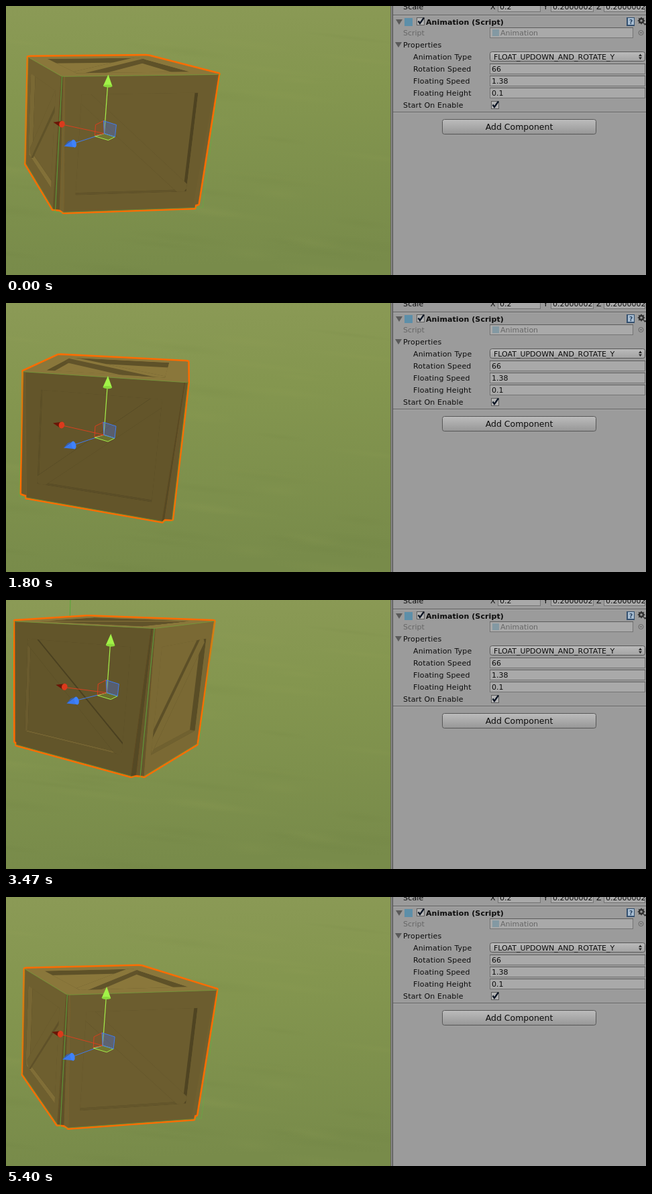
Recreate the animation shown at these times as an HTML page with a canvas. Size 954 by 402 pixels, loop 5.47 s.

```html
<!DOCTYPE html>
<html lang="en">
<head>
<meta charset="utf-8">
<title>Floating crate</title>
<style>
html, body { margin: 0; width: 100%; height: 100%; overflow: hidden; background: #9b9b9b; }
canvas { display: block; width: 954px; height: 402px; }
</style>
</head>
<body>
<canvas id="stage" width="954" height="402"></canvas>
<script>
const W = 954, H = 402, SCENE_W = 574;
const LOOP = 5470, STEP = 200 / 3, RAD = Math.PI / 180;
const stage = document.getElementById('stage').getContext('2d');
const backdrop = document.createElement('canvas');
backdrop.width = W;
backdrop.height = H;
let ctx = stage;

function path(points, open) {
  ctx.beginPath();
  points.forEach(([x, y], i) => i ? ctx.lineTo(x, y) : ctx.moveTo(x, y));
  if (!open) ctx.closePath();
}

function fill(points, color) {
  path(points);
  ctx.fillStyle = color;
  ctx.fill();
}

function line(points, color, width = 1) {
  path(points, true);
  ctx.strokeStyle = color;
  ctx.lineWidth = width;
  ctx.stroke();
}

function rect(x, y, w, h, color) {
  ctx.fillStyle = color;
  ctx.fillRect(x, y, w, h);
}

function text(str, x, y, { size = 11, weight = 400, color = '#0c0c0c', align = 'left', spacing = 0 } = {}) {
  ctx.font = `${weight} ${size}px "DejaVu Sans", sans-serif`;
  ctx.letterSpacing = spacing + 'px';
  ctx.textAlign = align;
  ctx.fillStyle = color;
  ctx.fillText(str, x, y);
}

// ---------- scene background and inspector panel ----------

function drawGround() {
  const g = ctx.createLinearGradient(0, 0, 20, H);
  g.addColorStop(0, '#8b9a56');
  g.addColorStop(0.35, '#84964f');
  g.addColorStop(1, '#788b4a');
  rect(0, 0, SCENE_W, H, g);

  ctx.save();
  ctx.beginPath();
  ctx.rect(0, 0, SCENE_W, H);
  ctx.clip();
  let seed = 7;
  const rnd = () => (seed = seed * 16807 % 2147483647) / 2147483647;
  for (let i = 0; i < 45; i++) {
    ctx.save();
    ctx.translate(rnd() * SCENE_W, rnd() * H);
    ctx.rotate(0.12);
    ctx.scale(40 + rnd() * 70, 4 + rnd() * 8);
    const tone = rnd() < 0.5 ? '160,170,90' : '90,110,50';
    const soft = ctx.createRadialGradient(0, 0, 0, 0, 0, 1);
    soft.addColorStop(0, `rgba(${tone},.07)`);
    soft.addColorStop(1, `rgba(${tone},0)`);
    rect(-1, -1, 2, 2, soft);
    ctx.restore();
  }
  ctx.restore();
}

function field(x, y, w, value, color) {
  rect(x, y, w, 16, '#747474');
  rect(x + 1, y + 1, w - 2, 14, '#a9a9a9');
  rect(x, y, w, 1, '#5c5c5c');
  if (value) {
    ctx.save();
    ctx.beginPath();
    ctx.rect(x, y, w - 1, 16);
    ctx.clip();
    text(value, x + 3, y + 12, { color });
    ctx.restore();
  }
}

function checkbox(x, y) {
  rect(x, y, 12, 12, '#5e5e5e');
  rect(x + 1, y + 1, 10, 10, '#b4b4b4');
  line([[x + 2.5, y + 5.5], [x + 5, y + 9], [x + 11, y + 0.5]], '#0b1524', 2.2);
}

function foldout(x, y) {
  fill([[x, y - 4], [x + 10, y - 4], [x + 5, y + 4]], '#5a5a5a');
}

function button(x, y, w, h, r, label, size, top, bottom) {
  const g = ctx.createLinearGradient(0, y, 0, y + h);
  g.addColorStop(0, top);
  g.addColorStop(1, bottom);
  ctx.beginPath();
  ctx.roundRect(x + 0.5, y + 0.5, w - 1, h - 1, r);
  ctx.fillStyle = g;
  ctx.fill();
  ctx.strokeStyle = '#575757';
  ctx.lineWidth = 1;
  ctx.stroke();
  if (label) text(label, x + w / 2, y + h / 2 + 4, { size, align: 'center' });
}

function drawInspector() {
  rect(SCENE_W, 0, W - SCENE_W, H, '#9b9b9b');
  rect(573, 0, 4, H, '#858585');
  rect(573, 0, 1, H, '#666b55');
  rect(576, 0, 1, H, '#4e4e4e');

  const label = (str, x, y) => text(str, x, y, { spacing: 0.18 });
  label('Scale', 592, 5);
  [['X', 722, '0.2'], ['Y', 801, '0.2000002'], ['Z', 880, '0.2000002']].forEach(([axis, x, value]) => {
    text(axis, x, 5);
    field(x + 11, -7, axis === 'Z' ? 62 : 64, value);
  });

  rect(577, 13, 377, 1, '#5f5f5f');
  rect(577, 14, 377, 1, '#a8a8a8');
  foldout(581, 24);
  rect(594, 18, 12, 12, '#5d8fa9');
  checkbox(612, 17);
  text('Animation (Script)', 626, 28, { weight: 700, spacing: 0.1 });

  rect(925, 17, 12, 13, '#34506f');
  rect(927, 18, 9, 10, '#a9bed2');
  text('?', 931.5, 27, { size: 9, weight: 700, color: '#1f3c5c', align: 'center' });
  ctx.strokeStyle = '#2f2f2f';
  ctx.lineWidth = 2.4;
  ctx.beginPath();
  ctx.arc(947, 22, 3, 0, 7);
  ctx.stroke();
  for (let i = 0; i < 8; i++) {
    const c = Math.cos(i * 45 * RAD), s = Math.sin(i * 45 * RAD);
    line([[947 + 3 * c, 22 + 3 * s], [947 + 5.3 * c, 22 + 5.3 * s]], '#2f2f2f', 1.6);
  }
  fill([[950, 26], [955, 26], [952.5, 29]], '#2f2f2f');

  const grey = '#676767';
  text('Script', 592, 44, { color: grey });
  field(721, 32, 214);
  rect(725, 35, 10, 10, '#8399a3');
  text('Animation', 737, 44, { color: grey });
  ctx.strokeStyle = grey;
  ctx.lineWidth = 1;
  ctx.beginPath();
  ctx.arc(946.5, 40, 3.5, 0, 7);
  ctx.stroke();
  rect(945.5, 39, 2, 2, grey);

  foldout(580, 58);
  label('Properties', 592, 62);
  label('Animation Type', 607, 80);
  button(721, 68, 232, 15, 3, '', 11, '#bcbcbc', '#a2a2a2');
  text('FLOAT_UPDOWN_AND_ROTATE_Y', 727, 79.5);
  fill([[943, 75], [948, 75], [945.5, 71.5]], '#222');
  fill([[943, 76.5], [948, 76.5], [945.5, 80]], '#222');
  [['Rotation Speed', '66'], ['Floating Speed', '1.38'], ['Floating Height', '0.1']].forEach(([name, value], i) => {
    label(name, 607, 98 + 18 * i);
    field(721, 86 + 18 * i, 232, value);
  });
  label('Start On Enable', 592, 152);
  checkbox(723, 142);
  rect(577, 158, 377, 1, '#646464');
  rect(577, 159, 377, 1, '#a6a6a6');
  button(650, 169, 230, 23, 3, 'Add Component', 12.5, '#bdbdbd', '#969696');
}

// ---------- camera and crate ----------

const PITCH = 14.1 * RAD, COS = Math.cos(PITCH), SIN = Math.sin(PITCH);

// World axes: x right, y up, z away from the viewer; origin at the pivot's rest position.
function project(x, y, z) {
  const depth = 6.86 + z * COS - y * SIN;
  return [-60 + 708 * (2 + x) / depth, 168 + 708 * (0.223 - y * COS - z * SIN) / depth];
}

const HALF = 0.975, TOP = 1, BOTTOM = -0.745, DEPTH = 0.07;
const TOP_CUT = 0.035, BOTTOM_CUT = 0.11;

const wood = v => `rgb(${v},${v * 0.86},${v * 0.43})`;
const faceLight = deg => 98 + Math.min(24, 38 * (1 - Math.cos((deg + 35) * RAD)));

function isFront(q) {
  let area = 0;
  q.forEach(([x, y], i) => {
    const [nx, ny] = q[(i + 1) % q.length];
    area += x * ny - nx * y;
  });
  return area > 0;
}

// Recessed panel with a diagonal plank; at(p, q, n) maps face coordinates to the screen.
function drawPanel(at, [p0, p1, q0, q1], rising, light, tone, plankLevel) {
  const rectAt = n => [at(p0, q1, n), at(p1, q1, n), at(p1, q0, n), at(p0, q0, n)];
  const wall = (a, b, k, level = 0) =>
    fill([at(...a, level), at(...b, level), at(...b, -DEPTH), at(...a, -DEPTH)], wood(light * k));
  ctx.save();
  path(rectAt(0));
  ctx.clip();
  fill(rectAt(0), wood(light * tone.side));
  wall([p0, q0], [p1, q0], tone.low);
  wall([p0, q0], [p0, q1], tone.left);
  fill(rectAt(-DEPTH), wood(light));

  const [a, b] = rising ? [[p0, q0], [p1, q1]] : [[p0, q1], [p1, q0]];
  const dx = b[0] - a[0], dy = b[1] - a[1], len = Math.hypot(dx, dy);
  const ox = -dy / len * 0.08, oy = dx / len * 0.08;
  const edge = s => [[a[0] + s * ox, a[1] + s * oy], [b[0] + s * ox, b[1] + s * oy]];
  const e1 = edge(1), e2 = edge(-1);
  wall(...e1, tone.plank, plankLevel);
  wall(...e2, tone.plank, plankLevel);
  fill([...e1, e2[1], e2[0]].map(p => at(...p, plankLevel)), wood(light));
  ctx.restore();
}

// Points of a side's outline, as [along, outward], for a given corner cut.
const leftEnd = cut => [-HALF + cut, HALF];
const rightEnd = cut => [HALF - cut, HALF];
const notch = cut => [HALF - 0.75 * cut, HALF - 0.75 * cut];
const nextSide = cut => [HALF, HALF - cut];

function drawCrate(angle, lift) {
  // Point on side k: s runs right along the side, n points outward.
  const side = (k, s, y, n) => {
    const a = (angle + 90 * k) * RAD, c = Math.cos(a), d = Math.sin(a);
    return project(s * c + n * d + 0.03, y + lift, s * d - n * c);
  };
  const put = (k, [s, n], y) => side(k, s, y, n);
  const band = (k, from, to, top = TOP_CUT, bottom = BOTTOM_CUT) => [
    put(k, from(top), TOP), put(k, to(top), TOP),
    put(k, to(bottom), BOTTOM), put(k, from(bottom), BOTTOM)];

  const parts = [], panels = [], edges = [], lid = [];
  for (let k = 0; k < 4; k++) {
    const turn = (((angle + 90 * k) % 360) + 540) % 360 - 180;
    const light = faceLight(turn);
    const quad = band(k, leftEnd, rightEnd);
    if (isFront(quad)) {
      parts.push([quad, wood(light)]);
      panels.push([k, turn, light]);
      edges.push(band(k, leftEnd, rightEnd, 0, 0));
    }
    const near = band(k, rightEnd, notch);
    const far = band(k, notch, nextSide);
    if (isFront(near)) parts.push([near, wood(light * 0.86)]);
    if (isFront(far)) parts.push([far, wood(light * 1.03)]);
    lid.push(put(k, leftEnd(TOP_CUT), TOP), put(k, rightEnd(TOP_CUT), TOP));
  }
  parts.push([lid, wood(138)]);

  ctx.lineJoin = 'round';
  parts.forEach(([q]) => {
    path(q);
    ctx.strokeStyle = '#ff6c00';
    ctx.lineWidth = 5.6;
    ctx.stroke();
  });
  parts.forEach(([q, color]) => {
    fill(q, color);
    ctx.strokeStyle = color;
    ctx.lineWidth = 0.6;
    ctx.stroke();
  });

  const m = HALF - 0.25;
  panels.forEach(([k, turn, light]) => {
    const away = turn < -30;
    const tone = { side: 0.73, low: away ? 1.16 : 0.92, left: away ? 1.08 : 0.95, plank: turn < -55 ? 0.86 : 0.75 };
    drawPanel((p, q, n) => side(k, p, q, HALF + n),
      [-m, m, BOTTOM + 0.23, TOP - 0.22], k % 2 === 1, light, tone, -DEPTH / 2);
  });
  drawPanel((p, q, n) => side(0, p, TOP + n, -q), [-m, m, -m, m], true, 138,
    { side: 0.68, low: 0.68, left: 0.68, plank: 0.7 }, 0);

  edges.forEach(q => {
    path(q);
    ctx.strokeStyle = 'rgba(95,180,65,.5)';
    ctx.lineWidth = 1;
    ctx.stroke();
  });
}

// ---------- move handles ----------

function cone(tip, base, radius, squash, dark, bright) {
  const a = Math.atan2(base[1] - tip[1], base[0] - tip[0]);
  const ox = -Math.sin(a) * radius, oy = Math.cos(a) * radius;
  fill([tip, [base[0] + ox, base[1] + oy], [base[0] - ox, base[1] - oy]], dark);
  ctx.beginPath();
  ctx.ellipse(base[0], base[1], radius * squash, radius, a, 0, 7);
  ctx.fillStyle = bright;
  ctx.fill();
}

function drawHandles([x, y]) {
  const at = (dx, dy) => [x + dx, y + dy];
  const rise = 191 - y, red = rise * 0.1, blue = -rise * 0.06;
  const plane = (pts, color, tint) => {
    const q = pts.map(p => at(...p));
    fill(q, tint);
    line([...q, q[0]], color);
  };
  line([at(0, 0), at(-60, -13 + red)], '#d8401f');
  line([at(0, 0), at(-43, 14 + blue)], '#3f7cf0');
  line([at(0, 0), at(5, -70)], '#a4f04a', 1.2);
  plane([[0, 0], [16, 5], [6, 10], [-14, 4]], '#a4f04a', 'rgba(140,220,60,.2)');
  plane([[0, 0], [-14, 3], [-13, -13], [-1, -19]], '#d8401f', 'rgba(200,60,30,.12)');
  plane([[0, 0], [16, 5], [18, -13], [-1, -19]], '#3f7cf0', 'rgba(70,110,220,.38)');
  cone(at(-76, -17 + red), at(-63, -14 + red), 5, 0.85, '#6a1607', '#dc3a1c');
  cone(at(-60, 19 + blue), at(-45, 15 + blue), 6, 0.55, '#3978ee', '#3f82fb');
  fill([at(-60, 19 + blue), at(-54, 12 + blue), at(-48, 9.5 + blue)], '#2c5fc4');
  cone(at(6, -88), at(5.3, -71), 6.8, 0.3, '#a2f248', '#8ad83a');
}

// ---------- timeline ----------

function frameIndex(ms) {
  const n = Math.round(ms / STEP);
  return Math.round(n * STEP / 10) * 10 > ms ? n - 1 : n;
}

function draw(ms) {
  const t = frameIndex(ms) * STEP / 1000;
  const lift = 0.11 - 0.43 * Math.sin(1.38 * (t + 0.18));
  ctx.drawImage(backdrop, 0, 0);
  if (t > 2.1 && t < 5.13) line([[96, 0], [94.5, 47]], '#55a836');
  drawCrate(4.5 - 66 * t, lift);
  drawHandles(project(0, lift, 0));
}

ctx = backdrop.getContext('2d');
drawGround();
drawInspector();
ctx = stage;

const start = performance.now();
function tick() {
  draw((performance.now() - start) % LOOP);
  requestAnimationFrame(tick);
}
tick();
</script>
</body>
</html>
```
